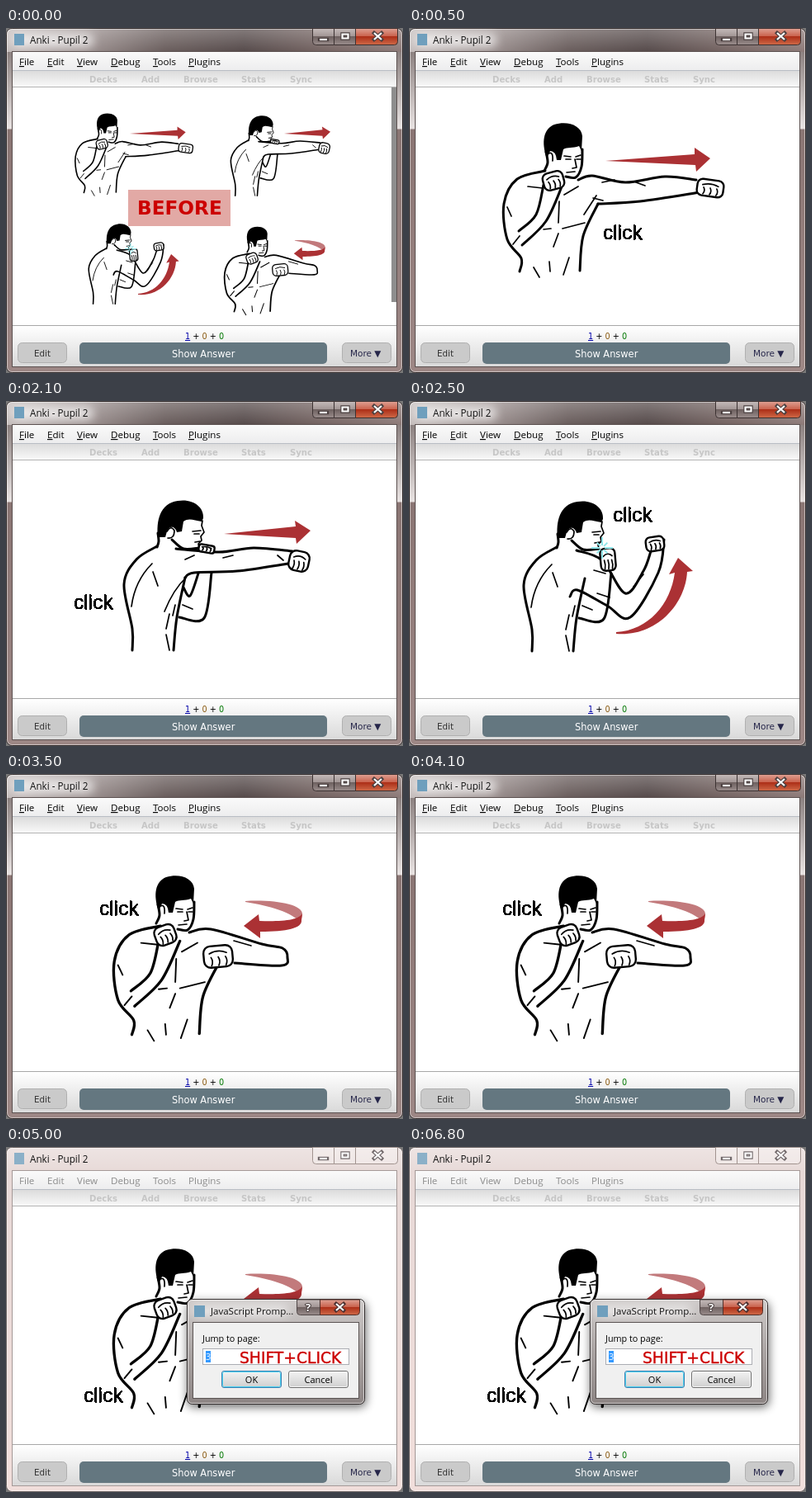
These frames come from a looping animation (481x418 px, 8 s). An HTML page:

```html
<!DOCTYPE html>
<html lang="en">
<head>
<meta charset="utf-8">
<title>Card viewer</title>
<style>
html, body { margin: 0; width: 100%; height: 100%; overflow: hidden; background: #777; }
svg { display: block; }
text { white-space: pre; }
.ui { font-family: "Open Sans", "Noto Sans", sans-serif; }
.web { font-family: "DejaVu Sans", sans-serif; }
.click { font: 24px "Liberation Sans", Arial, sans-serif; letter-spacing: .2px; stroke: #000; stroke-width: .8; filter: url(#crisp); }
.bold, .thin { fill: none; stroke: #000; stroke-width: 3; stroke-linecap: round; stroke-linejoin: round; }
.thin { stroke-width: 1.7; }
.skin { fill: #fff; stroke: #000; stroke-width: 2.4; }
.red { fill: #ab3134; }
</style>
</head>
<body>
<svg id="stage" width="481" height="418" viewBox="0 0 481 418">
<defs>
  <filter id="crisp" x="-10%" y="-10%" width="120%" height="120%"><feComponentTransfer><feFuncA type="discrete" tableValues="0 1"/></feComponentTransfer></filter>
  <filter id="blur" x="-30%" y="-100%" width="160%" height="300%"><feGaussianBlur stdDeviation="6"/></filter>
</defs>
</svg>
<script>
const NS = 'http://www.w3.org/2000/svg';
const stage = document.getElementById('stage');
const scenes = [];

function add(parent, tag, attrs, text) {
  const el = parent.appendChild(document.createElementNS(NS, tag));
  for (const key in attrs) el.setAttribute(key, attrs[key]);
  if (text !== undefined) el.textContent = text;
  return el;
}
const group = (parent, transform = '') => add(parent, 'g', { transform });
const path = (parent, d, attrs) => add(parent, 'path', { d, ...attrs });
const rect = (parent, x, y, width, height, fill, more) =>
  add(parent, 'rect', { x, y, width, height, fill, ...more });
const label = (parent, x, y, str, size, fill, more) =>
  add(parent, 'text', { x, y, class: 'ui', 'font-size': size, fill, ...more }, str);
const web = (parent, x, y, str, size, fill, more) =>
  label(parent, x, y, str, size, fill, { class: 'web', ...more });

// Stops are "colour" or "colour offset"; those without offset are evenly spaced.
function gradient(id, stops, across) {
  const g = add(stage.querySelector('defs'), 'linearGradient', across ? { id } : { id, x2: 0, y2: 1 });
  stops.forEach((s, i) => {
    const [color, at = i / (stops.length - 1)] = s.split(' ');
    add(g, 'stop', { offset: at, 'stop-color': color });
  });
}
gradient('glass', ['#c0b8b7', '#958988', '#5f5251', '#4a3e3e', '#6b5957', '#85716f'], true);
gradient('side', ['#6f6362', '#e8e2e1 .29', '#8a7573 .295', '#9d8785']);
gradient('pale', ['#e6d8d6', '#f1dedb']);
gradient('shine', ['#ffffff50', '#ffffff10']);
gradient('dark', ['#c5bbba', '#a19594 .48', '#6e6160 .5', '#9a8d8c']);
gradient('close', ['#dfa193', '#c9614c .48', '#ad2f18 .5', '#cf6a48']);
gradient('menu', ['#fafafa', '#ededee']);
gradient('tools', ['#dcdcdc', '#f8f8f8']);
gradient('foot', ['#fff', '#d9d9d9']);
gradient('button', ['#f3f3f3', '#cfcfcf']);
gradient('panel', ['#d0cccb', '#aaa4a3', '#8d8584']);

// A group that is visible only in the listed steps.
function scene(steps) {
  const el = group(stage);
  scenes.push({ el, steps });
  return el;
}

// Smooth bold line through a few "x,y" points.
function limb(g, str) {
  const p = str.split(' ').map(s => s.split(',').map(Number));
  const at = i => p[Math.max(0, Math.min(p.length - 1, i))];
  const bend = (i, sign) => at(i).map((v, k) => v + sign * (at(i + 1)[k] - at(i - 1)[k]) / 6);
  let d = 'M' + p[0];
  for (let i = 1; i < p.length; i++) d += `C${bend(i - 1, 1)} ${bend(i, -1)} ${p[i]}`;
  path(g, d, { class: 'bold' });
}
const crease = (g, d) => path(g, d, { class: 'thin' });

// Blocky hand: rounded box, three finger gaps and a thumb.
function fist(parent, x, y, w, h, turn) {
  const g = group(parent, `translate(${x} ${y}) rotate(${turn})`);
  rect(g, -w / 2, -h / 2, w, h, '#fff', { rx: Math.min(w, h) * .32, class: 'skin' });
  for (let i = -1; i <= 1; i++) crease(g, `M${i * w / 4} ${h / 2 - 2}q${w / 12} ${-h / 5} 0 ${-h * .4}`);
  crease(g, `M${-w * .3} ${-h * .15}q${w * .3} ${-h * .2} ${w * .6} 0`);
}

function frontHead(g) {
  path(g, 'M167 158C160 138 163 122 176 117C192 112 209 118 210 131L209 149L206 143C198 146 192 144 187 147L184 160L179 160Q178 149 171 149Z');
  limb(g, '210,147 209,168 202,181 190,180');
  limb(g, '166,150 168,163 164,173');
  crease(g, 'M169 152q6-3 5 9M188 155l8 1M202 156l6-2M190 159h6M203 159h5M201 159l2 10-5 1M191 175l10-1');
}
function sideHead(g) {
  path(g, 'M184 165C182 146 186 124 208 121C226 118 240 128 239 142L237 146C228 145 222 141 215 146L213 158L207 159C204 150 197 152 195 158L193 165Z');
  limb(g, '184,160 185,170 183,177');
  limb(g, '201,168 215,179 234,178');
  crease(g, 'M195 158q5-8 9-1 0 10-8 9M238 145l-1 6 3 8-4 5 1 5-4 4 1 5M226 158l10-1M228 161h6M229 171l6-1');
}

// Chest, shoulder and raised left forearm seen from the front.
function bust(g) {
  limb(g, '165,173 131,183 115,213 119,256 136,279 134,295');
  limb(g, '163,190 154,226 133,246');
  limb(g, '186,190 166,234 137,263');
  limb(g, '229,213 211,252 207,294');
  crease(g, 'M144 192l18 2M188 202l17-10M182 210l-1 26M163 244l9-1M186 243l27-7M119 217l5 11M126 262l8-10M181 249l-6 16M170 283l1 12M194 278l-7 21M151 290l7 12');
}

// Head, back and guarding elbow seen from behind.
function back(g) {
  limb(g, '183,176 158,192 143,222 153,276 153,302');
  limb(g, '217,214 207,262 203,302');
  limb(g, '249,208 240,263 210,262');
  crease(g, 'M177 197Q156 218 152 249M178 207l6 17M198 258l-4 18M205 247l-3 13M194 283l4 19M214 247l12 5');
  sideHead(g);
}

function jab(g) {
  bust(g);
  limb(g, '205,184 222,179 262,187 310,180 348,184');
  limb(g, '353,199 280,210 229,213');
  crease(g, 'M223 206l12 3M212 226l15-23M234 187l15-3M275 187l11 4');
  frontHead(g);
  fist(g, 175, 185, 25, 21, -15);
  fist(g, 365, 194, 32, 20, 8);
  path(g, 'M238 161L346 153V145L365 158L348 174L347 166Z', { class: 'red' });
}

function cross(g) {
  back(g);
  limb(g, '206,179 258,183 300,178 347,182');
  limb(g, '342,197 280,206 228,208 217,214');
  limb(g, '215,226 223,236 233,209');
  crease(g, 'M218 214Q203 228 192 255M217 192l11-5M263 190l12-3M329 187l7 6');
  fist(g, 243, 179, 19, 9, 10);
  fist(g, 355, 194, 24, 24, 12);
  path(g, 'M264 161L351 152L350 145L369 157L352 173L351 166Z', { class: 'red' });
}

function uppercut(g) {
  back(group(g, 'translate(-4 1)'));
  limb(g, '203,181 234,193 262,233 284,206 293,182');
  limb(g, '195,237 204,229 240,248 268,262 302,208 309,168');
  crease(g, 'M224 205l14 4M228 233l15 5M272 225l12-15');
  fist(g, 241, 192, 18, 27, -5);
  fist(g, 298, 173, 22, 17, -8);
  for (let i = 0; i < 8; i++)
    path(g, `M3 0H${i % 2 ? 9 : 13}`, { transform: `translate(234 178) rotate(${i * 45})`, stroke: '#8fe6ea', 'stroke-width': 2 });
  path(g, 'M251 280C290 278 317 246 322 208L315 210L326 190L344 206L337 207C335 246 300 286 251 282Z', { class: 'red' });
}

function hook(g) {
  bust(group(g, 'matrix(1.12 0 0 1.08 2.4 -2.8)'));
  limb(g, '222,192 248,188 310,206 335,211 341,222 334,232 277,229');
  crease(g, 'M276 202l21 6');
  const top = group(g, 'translate(18 8)');
  frontHead(top);
  fist(top, 175, 187, 25, 23, -20);
  fist(g, 257, 221, 35, 26, -5);
  path(g, 'M290 154C325 152 360 158 359 170L357 181C347 167 320 160 290 155Z', { fill: '#c27a7c' });
  path(g, 'M359 169C355 177 335 179 307 178L306 170L288 184L308 199V191C340 191 359 187 358 177Z', { class: 'red' });
}

// Caption button: flat top, optional rounded lower corners.
function capButton(g, x, y, w, h, fill, stroke, left, right, opacity = 1) {
  path(g, `M${x} ${y}h${w}v${h - right}q0 ${right} ${-right} ${right}h${left + right - w}q${-left} 0 ${-left} ${-left}Z`,
    { fill, stroke, 'fill-opacity': opacity });
}
function glyph(g, d, ink) {
  path(g, d, { fill: 'none', stroke: ink, 'stroke-width': 4.4, 'stroke-linecap': 'square' });
  path(g, d, { fill: 'none', stroke: '#fff', 'stroke-width': 2.2 });
}

function chrome(steps, active) {
  const g = scene(steps);
  const top = 'M1 29V8Q1 1 8 1H473Q480 1 480 8V29Z';
  rect(g, .5, .5, 480, 417, active ? 'url(#side)' : 'url(#pale)', { rx: 7, stroke: active ? '#2f2828' : '#6d6463' });
  path(g, top, { fill: active ? 'url(#glass)' : '#e6d8d6' });
  path(g, top, { fill: 'url(#shine)' });
  rect(g, 1.5, 1.5, 478, 415, 'none', { rx: 6, stroke: '#fff', 'stroke-opacity': .5 });
  if (active) rect(g, 8, 7, 98, 16, '#fff', { rx: 7, opacity: .7, filter: 'url(#blur)' });
  rect(g, 7.5, 28.5, 466, 382, '#fff', { stroke: active ? '#5c5150' : '#a59997' });
  rect(g, 10, 7, 12, 14, active ? '#6f9fbd' : '#8bb0c8');
  label(g, 29, 19, 'Anki - Pupil 2', 11.7, '#111');

  const fill = active ? 'url(#dark)' : '#fff';
  const stroke = active ? '#3c3232' : '#a1938f';
  const alpha = active ? 1 : .3;
  capButton(g, 371.5, .5, 26, 20, fill, stroke, 4, 0, alpha);
  capButton(g, 397.5, .5, 26, 20, fill, stroke, 0, 0, alpha);
  capButton(g, 423.5, .5, 51, 20, active ? 'url(#close)' : fill, stroke, 0, 4, alpha);
  for (const d of ['M380 14h9', 'M407.500 7.500h7v5h-7z', 'M446 6l9 8m0-8l-9 8']) glyph(g, d, active ? '#4b4040' : '#71686a');

  rect(g, 8, 29, 465, 22, 'url(#menu)');
  const items = { File: 16, Edit: 50, View: 86, Debug: 127, Tools: 178, Plugins: 221 };
  for (const name in items) {
    const t = label(g, items[name], 45, '', 11.6, active ? '#000' : '#8b8b8b');
    add(t, 'tspan', active ? { 'text-decoration': 'underline' } : {}, name[0]);
    add(t, 'tspan', {}, name.slice(1));
  }
}

function page() {
  const g = group(stage);
  rect(g, 8, 51, 465, 1, '#b9bdc4');
  rect(g, 8, 52, 465, 19, 'url(#tools)');
  rect(g, 8, 71, 465, 1, '#b4b4b4');
  const links = { Decks: 101, Add: 164, Browse: 215, Stats: 285, Sync: 344 };
  for (const name in links) web(g, links[name], 66, name, 10.1, '#c6c6c6', { 'font-weight': 'bold' });
  rect(g, 8, 72, 465, 288, '#fff');
  rect(g, 8, 360, 465, 1, '#a8a8a8');
  rect(g, 8, 361, 465, 49, 'url(#foot)');
  const count = web(g, 217, 377, '', 9.7, '#000');
  add(count, 'tspan', { fill: '#00a', 'text-decoration': 'underline' }, '1');
  for (const fill of ['#8a5a10', '#070']) {
    add(count, 'tspan', {}, ' + ');
    add(count, 'tspan', { fill }, '0');
  }
  for (const x of [14.5, 407.5]) rect(g, x, 381.5, 59, 24, '#cacaca', { rx: 5, stroke: '#b0b0b0' });
  rect(g, 89, 381, 300, 26, '#647780', { rx: 5 });
  web(g, 34, 398, 'Edit', 10.3, '#333');
  web(g, 417, 398, 'More ▼', 10.5, '#26264a');
  web(g, 201, 399, 'Show Answer', 11.4, '#fff');
}

function dialog(g) {
  rect(g, 220, 188, 216, 127, '#000', { rx: 7, opacity: .6, filter: 'url(#blur)' });
  rect(g, 219.5, 184.5, 215, 127, 'url(#panel)', { rx: 6, stroke: '#302a2a' });
  rect(g, 220.5, 185.5, 213, 125, 'none', { rx: 5, stroke: '#fff', 'stroke-opacity': .6 });
  rect(g, 226, 192, 116, 14, '#fff', { rx: 6, opacity: .6, filter: 'url(#blur)' });
  rect(g, 228, 192, 13, 14, '#6f9fbd');
  label(g, 248, 203, 'JavaScript Promp...', 11.5, '#111');
  capButton(g, 352.5, 185, 28, 18.5, 'url(#dark)', '#514848', 4, 0);
  capButton(g, 380.5, 185, 48, 18.5, 'url(#close)', '#51302a', 0, 4);
  label(g, 363, 199, '?', 13, '#fff', { 'font-weight': 'bold', stroke: '#4b4040', 'stroke-width': 2, 'paint-order': 'stroke' });
  glyph(g, 'M400 190l9 8m0-8l-9 8', '#4b3030');
  rect(g, 226.5, 212.5, 201, 92, '#f0f0f0', { stroke: '#5b5453' });
  label(g, 238, 236, 'Jump to page:', 10.8, '#000');
  rect(g, 238.5, 244.5, 177, 19, '#fff', { stroke: '#abadb3' });
  rect(g, 242, 247, 6, 14, '#3399ff');
  label(g, 242, 258, '3', 10.8, '#fff');
  [['OK', 261.5, '#3c7fb1', '#48d1f0'], ['Cancel', 342.5, '#707070', '#f6f6f6']].forEach(([name, x, rim, glow]) => {
    rect(g, x, 271.5, 72, 20, 'url(#button)', { rx: 2.5, stroke: rim });
    rect(g, x + 1, 272.5, 70, 18, 'none', { rx: 2, stroke: glow });
    label(g, x + 36, 286, name, 11, '#000', { 'text-anchor': 'middle' });
  });
}

chrome([0, 1, 2, 3, 4], true);
chrome([5, 6], false);
page();

const overview = scene([0]);
const small = [[jab, 22.8, 42], [cross, 196, 42], [uppercut, 26, 172.5], [hook, 195, 175]];
small.forEach(([draw, x, y]) => draw(group(overview, `translate(${x} ${y}) scale(.534)`)));
rect(overview, 467, 72, 6, 260, '#8e8e8e');
rect(overview, 148, 196, 124, 44, '#bd382f', { opacity: .43 });
web(overview, 159, 226, 'BEFORE', 23.2, '#cc0000', { 'font-weight': 'bold' });

const poses = [[jab, [1], 235, 256], [cross, [2], 82, 252], [uppercut, [3], 247, 146], [hook, [4], 113, 171], [hook, [5, 6], 94, 309]];
poses.forEach(([draw, steps, x, y]) => {
  const g = scene(steps);
  draw(g);
  add(g, 'text', { x, y, class: 'click' }, 'click');
});
dialog(scene([5, 6]));
web(scene([6]), 283, 262, 'SHIFT+CLICK', 18.7, '#cc0000', { stroke: '#cc0000', 'stroke-width': .4 });

const LOOP = 8000;
const starts = [0, 500, 1500, 2500, 3500, 4500, 5000];
const begin = performance.now();
let shown = -1;

function tick() {
  const t = (performance.now() - begin) % LOOP;
  const step = starts.filter(s => s <= t).length - 1;
  if (step !== shown) {
    scenes.forEach(s => { s.el.style.display = s.steps.includes(step) ? '' : 'none'; });
    shown = step;
  }
  requestAnimationFrame(tick);
}
tick();
</script>
</body>
</html>
```
